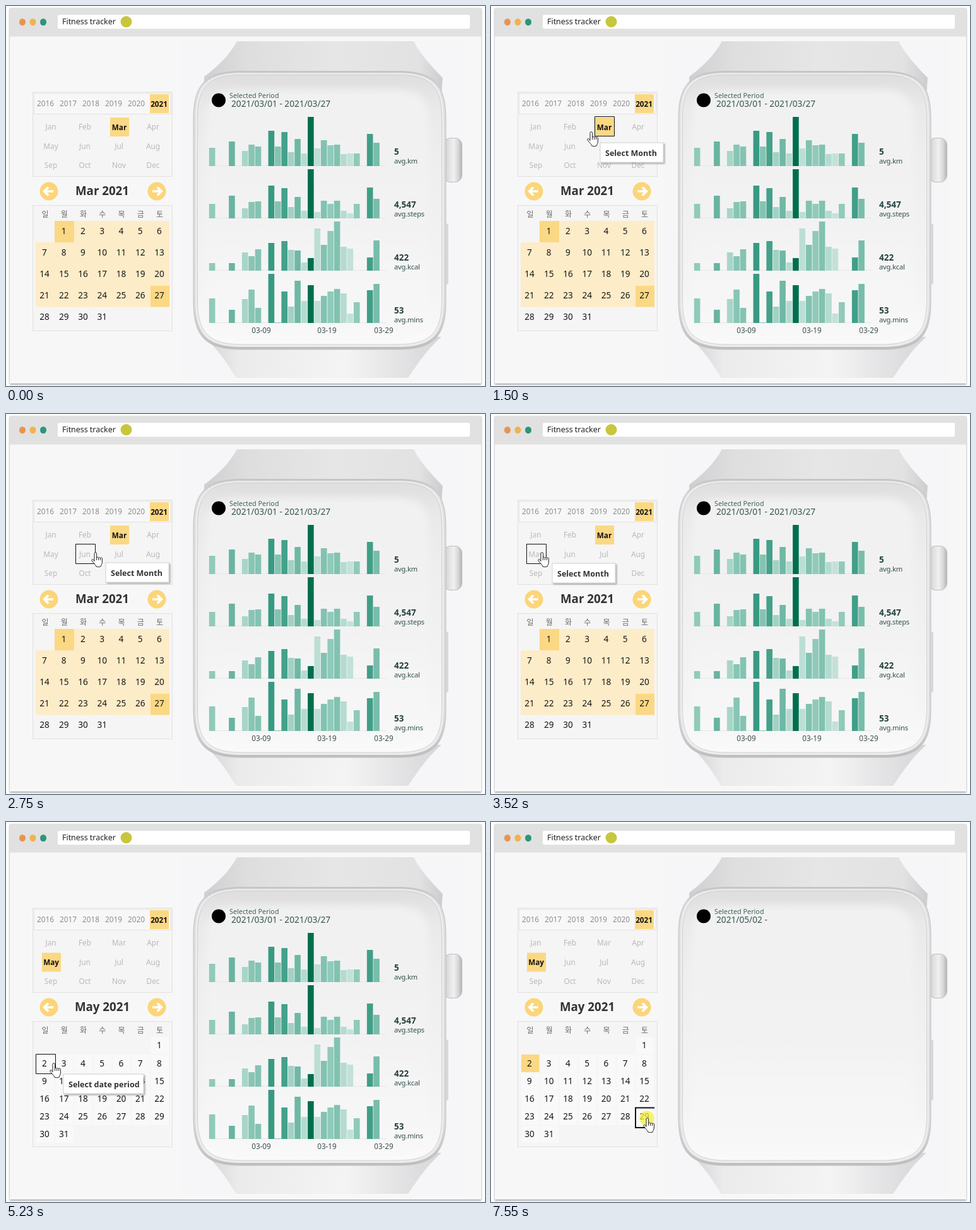
Write an HTML page that moves like this. It is 759 px wide and 603 px high and loops after 8000 ms.

```html
<!DOCTYPE html>
<html lang="en">
<head>
<meta charset="utf-8">
<title>Fitness tracker</title>
<style>
  html, body { margin: 0; width: 100%; height: 100%; overflow: hidden; background: #fff; }
  svg { display: block; width: 759px; height: 603px; }
  text { font-family: "Noto Sans", "Open Sans", "Noto Sans CJK KR", sans-serif; }
  .mid { text-anchor: middle; }
  .pale { font-size: 11.8px; font-weight: 500; fill: #b9b9b9; }
  .year { fill: #8d8d8d; }
  .on { font-size: 11.7px; font-weight: 700; fill: #111; }
  .week { font: 12px "Noto Sans CJK KR", "Noto Sans CJK", sans-serif; fill: #6a6a6a; }
  .day { font-size: 13.6px; fill: #161616; }
  .title { font-size: 18.7px; font-weight: 700; fill: #333; }
  .value { font-size: 13.5px; font-weight: 700; fill: #24423d; }
  .unit { font-size: 11.2px; letter-spacing: -.2px; fill: #31504b; }
  .tip { font-size: 12.5px; font-weight: 600; fill: #333; }
</style>
</head>
<body>
<svg viewBox="0 0 759 603" xmlns="http://www.w3.org/2000/svg">
  <defs>
    <linearGradient id="strap"><stop stop-color="#cfcfd1"/><stop offset=".18" stop-color="#dededf"/><stop offset=".55" stop-color="#e6e6e7"/><stop offset=".9" stop-color="#e2e2e3"/><stop offset="1" stop-color="#cdcdcf"/></linearGradient>
    <linearGradient id="strapLow"><stop stop-color="#d2d2d4"/><stop offset=".15" stop-color="#ebebec"/><stop offset=".6" stop-color="#f4f4f5"/><stop offset="1" stop-color="#d6d6d8"/></linearGradient>
    <linearGradient id="case" x2="0" y2="1"><stop stop-color="#c6c6c6"/><stop offset=".06" stop-color="#dcdcdc"/><stop offset=".85" stop-color="#d9d9d9"/><stop offset="1" stop-color="#bdbdbd"/></linearGradient>
    <linearGradient id="glass" x2="0" y2="1"><stop stop-color="#dedede"/><stop offset=".12" stop-color="#e9e9e9"/><stop offset=".3" stop-color="#eeeeee"/><stop offset=".8" stop-color="#f4f4f4"/><stop offset="1" stop-color="#fafafa"/></linearGradient>
    <linearGradient id="inner" x2="0" y2="1"><stop stop-color="#f1f1f1"/><stop offset=".5" stop-color="#f2f2f2"/><stop offset="1" stop-color="#f8f8f8"/></linearGradient>
    <linearGradient id="crown"><stop stop-color="#bcbcbc"/><stop offset=".2" stop-color="#dcdcdc"/><stop offset=".55" stop-color="#f0f0f0"/><stop offset=".8" stop-color="#d6d6d6"/><stop offset="1" stop-color="#b4b4b4"/></linearGradient>
    <filter id="soft"><feGaussianBlur stdDeviation="6"/></filter>
    <filter id="shade" x="-10%" y="-10%" width="120%" height="120%"><feDropShadow dx="0" dy="1.5" stdDeviation="1.8" flood-opacity=".42"/></filter>
    <filter id="lift" x="-10%" y="-20%" width="125%" height="150%"><feDropShadow dx="2" dy="2" stdDeviation="1.3" flood-opacity=".3"/></filter>
  </defs>
  <rect x="6" y="3" width="747" height="596" fill="#f7f7f7" filter="url(#shade)"/>
  <rect x="6" y="3" width="747" height="45.5" fill="#e1e1e1"/>
  <ellipse cx="26" cy="25.5" rx="5" ry="5.5" fill="#ea944f"/>
  <ellipse cx="42.5" cy="25.5" rx="5" ry="5.5" fill="#f1b24f"/>
  <ellipse cx="59" cy="25.5" rx="5" ry="5.5" fill="#2c957c"/>
  <rect x="82" y="14" width="653" height="22" rx="2" fill="#fff"/>
  <text x="89" y="29" font-size="12.4" font-weight="500" fill="#222">Fitness tracker</text>
  <circle cx="190.5" cy="25" r="9" fill="#c8c63c"/>
  <g id="watch"></g>
  <g id="chart"></g>
  <circle cx="337" cy="149.5" r="11" fill="#000"/>
  <text x="354" y="146" font-size="10.8" fill="#3c625c">Selected Period</text>
  <text id="period" x="357" y="160" font-size="13.7" fill="#35544f"></text>
  <g id="panel"></g>
  <g id="mar"></g>
  <g id="may"></g>
  <g id="arrows"></g>
  <path id="box" fill="none" stroke="#111"/>
  <g id="tip"><rect height="31" fill="#fff" stroke="#cfcfcf" filter="url(#lift)"/><text class="tip" x="8" y="20.5"></text></g>
  <circle id="click" cx="247" cy="470" r="11.5" fill="#f6ef3c" fill-opacity=".75"/>
  <path id="cursor" fill="#fff" stroke="#222" stroke-linejoin="round"/>
</svg>
<script>
const $ = id => document.getElementById(id);
const text = (x, y, cls, s) => `<text x="${x}" y="${y}" class="${cls}">${s}</text>`;
const rect = (x, y, w, h, fill, more = '') =>
  `<rect x="${x}" y="${y}" width="${w}" height="${h}" fill="${fill}" ${more}/>`;
const path = (d, more) => `<path d="${d}" ${more}/>`;

// Rounded watch outline
function shell(l, t, r, b, c) {
  const k = c * .26;
  return `M${l} ${t + c}C${l} ${t + k} ${l + k} ${t} ${l + c} ${t}H${r - c}C${r - k} ${t} ${r} ${t + k} ${r} ${t + c}` +
    `V${b - c}C${r} ${b - k} ${r - k} ${b} ${r - c} ${b}H${l + c}C${l + k} ${b} ${l} ${b - k} ${l} ${b - c}Z`;
}
$('watch').innerHTML =
  rect(276, 56, 450, 534, '#f6f6f8') +
  path('M366 56H646C655 74 672 94 692 114L690 140H314V112C336 96 354 78 366 56Z', 'fill="url(#strap)"') +
  path('M312 525C338 545 350 568 365 590H637C653 568 664 548 690 525Z', 'fill="url(#strapLow)"') +
  rect(693.5, 209.5, 29, 70, 'url(#crown)', 'rx="11" stroke="#bdbdbd"') +
  rect(696, 346, 4, 95, '#e2e2e2', 'rx="1.5" stroke="#bcbcbc" stroke-width=".8"') +
  path(shell(297, 103.5, 697, 545, 76), 'fill="url(#case)" stroke="#c3c3c3"') +
  path(shell(300, 106, 694, 541, 73), 'fill="#ececec"') +
  path(shell(303.5, 109, 690.5, 537, 70), 'fill="url(#glass)" stroke="#d0d0d0"') +
  path(shell(318, 133, 670, 526, 52), 'fill="url(#inner)" filter="url(#soft)"');

// Daily bars: km, steps, kcal, mins
const rows = [
  ['5', 'avg.km', 254, [29,1,0,39,0,24,34,31,0,56,31,54,22,43,20,78,28,41,33,34,19,20,20,0,51,37]],
  ['4,547', 'avg.steps', 337, [23,1,0,36,0,16,26,27,0,52,27,48,18,34,12,78,10,28,23,28,12,8,23,0,49,31]],
  ['422', 'avg.kcal', 420, [12,0,0,12,0,29,23,34,0,44,0,47,33,32,13,20,67,41,63,78,38,35,0,0,21,48]],
  ['53', 'avg.mins', 503, [39,0,0,21,0,38,53,24,0,78,1,50,26,67,35,60,35,43,50,54,47,15,33,0,52,62]]
];
const shades = [[0, 222, 238, 233], [23, 144, 202, 186], [52, 56, 154, 130], [78, 0, 110, 78]];
function shade(v) {
  const i = v <= 23 ? 0 : v <= 52 ? 1 : 2, a = shades[i], b = shades[i + 1];
  const k = (v - a[0]) / (b[0] - a[0]);
  return `rgb(${[1, 2, 3].map(n => Math.round(a[n] + (b[n] - a[n]) * k))})`;
}
$('chart').innerHTML = rows.map(([value, unit, base, heights], r) =>
  rect(322, base - 1, 281, 1, '#e4e6e5') +
  heights.map((h, i) => h ? rect((321.8 + 10.42 * i).toFixed(1), base - h, 9.6, h, shade(rows[1][3][i])) : '').join('') +
  text(615, 236 + 84 * r, 'value', value) + text(615, 249.5 + 84 * r, 'unit', unit)
).join('') + [[404.5, '03-09'], [508.5, '03-19'], [598.5, '03-29']].map(([x, s]) =>
  `<text class="mid" x="${x}" y="519" font-size="11.7" fill="#3d504c">${s}</text>`).join('');

const gold = '#fbd883', line = 'stroke="#e2e2e2"';
const months = 'Jan Feb Mar Apr May Jun Jul Aug Sep Oct Nov Dec'.split(' ');
const monthAt = i => [71 + 54 * (i % 4), 196 + 30.5 * Math.floor(i / 4)];
const col = i => 61.5 + 30.25 * i;
$('panel').innerHTML =
  rect(42.5, 136.5, 221, 134, '#f5f5f5', line) + rect(44.5, 138.5, 217, 33, '#f7f7f7', line) +
  rect(228, 140, 30, 30, gold) +
  [0, 1, 2, 3, 4, 5].map(i => text(62.5 + 36 * i, i < 5 ? 159 : 160, 'mid ' + (i < 5 ? 'pale year' : 'on'), 2016 + i)).join('') +
  months.map((m, i) => i == 2 || i == 4 ? '' : text(...monthAt(i), 'mid pale', m)).join('') +
  rect(42.5, 316.5, 221, 199, '#f5f5f5', line) +
  [...'일월화수목금토'].map((s, i) => text(col(i) + .5, 335, 'mid week', s)).join('');

// Month highlight, heading and numbered days
function month(name, i, other, first, y0, step) {
  const [x, y] = monthAt(i), [ox, oy] = monthAt(other);
  let s = rect(x - 14, y - 19, 30, 30, gold) + text(x + .5, y + .5, 'mid on', name) +
    text(ox, oy, 'mid pale', months[other]) + text(152.5, 300, 'mid title', name + ' 2021');
  for (let d = 1; d <= 31; d++) {
    const n = d + first - 1;
    s += text(col(n % 7) - (n % 7 ? 0 : .5), y0 + step * Math.floor(n / 7), 'mid day', d);
  }
  return s;
}
$('mar').innerHTML =
  rect(77, 341, 182, 34, '#fdecc8') + rect(47, 375, 212, 102.5, '#fdecc8') +
  rect(77, 341, 31, 34, gold) + rect(229, 444, 30, 33.5, gold) +
  month('Mar', 2, 4, 1, 362.3, 33.8);
let cells = '';
for (let n = 6; n < 37; n++)
  cells += rect(48 + 30.25 * (n % 7), 341 + 28.2 * Math.floor(n / 7), 28.5, 27, '#f9f9f9');
$('may').innerHTML = cells + rect(48, 369, 28.5, 28, gold, 'id="start"') + month('May', 4, 2, 6, 359.3, 28.2);

const disc = (x, dir) => `<g transform="translate(${x} 294) scale(${dir} 1)"><circle r="14.5" fill="#fcd579"/>` +
  path('M-7 0H7.5M.8-6.5L7.5 0L.8 6.5', 'fill="none" stroke="#fff" stroke-width="3.4"') + '</g>';
$('arrows').innerHTML = disc(68, -1) + disc(239, 1);

const shapes = {
  hand: 'M5 14.5V2.5a1.8 1.8 0 0 1 3.6 0V9a1.6 1.6 0 0 1 3 .5a1.6 1.6 0 0 1 3 .6a1.4 1.4 0 0 1 2.8.8V16c0 3.2-1.6 4.4-2.3 7q-3.5 1.4-7.2 0C7 20 3 17 1 13.6C.2 12 2 10.9 3.2 12.1ZM8.6 9v4M11.6 9.5V13M14.6 10.2V13',
  arrow: 'M.5.5V16.5L4.1 13.2L7 19.5L9.6 18.3L6.8 12.2H11.5Z'
};
const sq = (x, y) => `M${x} ${y}h31v31h-31Z`;
const feb = sq(110.5, 175.5), mar = sq(164.5, 175.5), may = sq(56.5, 206.5), jun = sq(110.5, 206.5),
  jul = sq(164.5, 206.5), aug = sq(218.5, 206.5), day4 = sq(108.5, 368.5), day2 = sq(47.5, 368.5),
  day29 = 'M259 453.5H229V485H259';
const tipDate = [81, 398];

// Start time, pointer, its place, outlined cell, tooltip place
const steps = [
  [0],
  [860, 'arrow', 514, 537],
  [1010, 'hand', 319, 398],
  [1330, 'arrow', 235, 300],
  [1500, 'hand', 152, 199, mar, [173, 217]],
  [1800, 'hand', 126, 190, feb, [148, 208]],
  [1970, 'hand', 179, 199, mar, [200, 218]],
  [2270, 'hand', 213, 218, aug, [235, 234]],
  [2440, 'hand', 182, 218, jul, [217, 234]],
  [2750, 'hand', 135, 219, jun, [158, 236]],
  [2900, 'hand', 104, 219, jun, [127, 236]],
  [3200, 'hand', 90, 220],
  [3360, 'hand', 78, 220, may],
  [3520, 'hand', 74, 219, may, [97, 237]],
  [3830, 'hand', 73.5, 220, may, [97, 237]],
  [4300, 'hand', 73.5, 220],
  [4760, 'hand', 95, 300],
  [4930, 'hand', 112, 381, day4, [134, 398]],
  [5230, 'hand', 69, 382, day2, [91, 400]],
  [5390, 'hand', 60, 381, day2, tipDate],
  [5850, 'hand', 69, 400, day2, tipDate],
  [6180, 'hand', 165, 440, day2, tipDate],
  [6330, 'arrow', 249, 489, day2, tipDate],
  [6640, 'arrow', 247, 470, day2, tipDate],
  [6790, 'hand', 241, 469],
  [7100, 'hand', 241, 469, day29]
];
const show = (id, on) => $(id).style.display = on ? '' : 'none';

function draw(now) {
  const t = now % 8000;
  const [, kind, x, y, box, tip] = steps.findLast(s => s[0] <= t);
  const picked = t >= 4300, cleared = t >= 6790;
  show('mar', !picked);
  show('may', picked);
  show('chart', !cleared);
  show('start', cleared);
  show('click', t >= 7550);
  $('period').textContent = cleared ? '2021/05/02 -' : '2021/03/01 - 2021/03/27';
  $('arrows').style.opacity = t < 4300 || t >= 4760 ? 1 : t < 4440 ? .25 : .6;

  show('cursor', kind);
  if (kind) {
    $('cursor').setAttribute('d', shapes[kind]);
    $('cursor').setAttribute('transform', `translate(${x} ${y})`);
  }
  show('box', box);
  if (box) {
    const thick = t >= 7550 || t >= 5700 && t < 6790;
    $('box').setAttribute('d', box);
    $('box').setAttribute('stroke-width', thick ? 2 : 1);
  }
  show('tip', tip);
  if (tip) {
    const [frame, label] = $('tip').children;
    $('tip').setAttribute('transform', `translate(${tip})`);
    frame.setAttribute('width', picked ? 127 : 100);
    label.textContent = picked ? 'Select date period' : 'Select Month';
  }
}

const begin = performance.now();
(function tick() {
  draw(performance.now() - begin);
  requestAnimationFrame(tick);
})();
</script>
</body>
</html>
```
